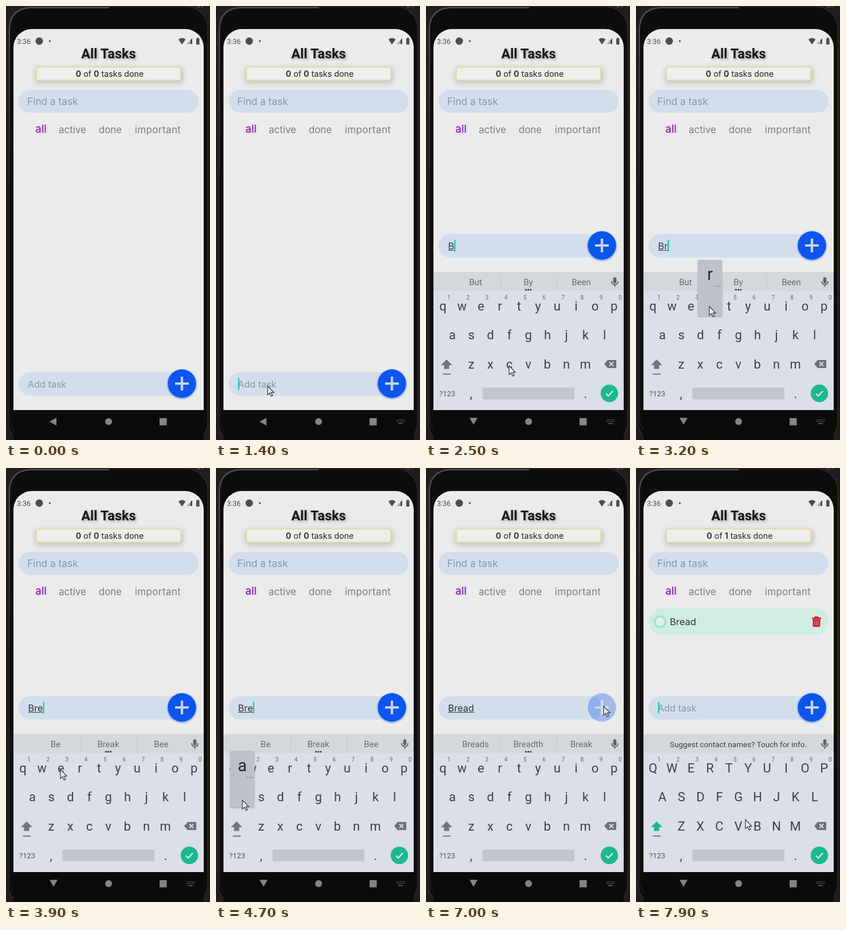
An HTML page for the animation above (8 s loop, 356 by 754 pixels).

```html
<!DOCTYPE html>
<html lang="en">
<head>
<meta charset="utf-8">
<title>Task list</title>
<style>
  html, body { margin: 0; width: 100%; height: 100%; overflow: hidden; background: #161618; }
  svg { display: block; width: 356px; height: 754px; font-family: Inter, "Open Sans", sans-serif; }
  .roboto { font-family: Roboto, Arial, sans-serif; }
  .mid { text-anchor: middle; }
  .hint { fill: #8a93ae; }
  .key { font-size: 22px; fill: #3a4048; }
  .digit { font-size: 10px; fill: #60666f; }
  .word { font-size: 15px; fill: #666b73; }
  .filter { font-size: 17px; fill: #7d7d83; }
</style>
</head>
<body>
<svg viewBox="0 0 356 754">
  <defs>
    <clipPath id="screen"><path d="M13 702V72A32 32 0 0 1 45 40H313A32 32 0 0 1 345 72V702Z"/></clipPath>
    <filter id="soft" x="-20%" y="-80%" width="140%" height="260%"><feGaussianBlur stdDeviation="5"/></filter>
    <filter id="glow" x="-20%" y="-50%" width="140%" height="200%"><feGaussianBlur stdDeviation="1.2"/></filter>
    <filter id="titleShadow" x="-10%" y="-30%" width="120%" height="180%">
      <feDropShadow dx="2" dy="2" stdDeviation="2" flood-color="#555" flood-opacity=".5"/>
    </filter>
    <filter id="tabShadow" x="-30%" y="-30%" width="160%" height="180%">
      <feDropShadow dx="1" dy="1" stdDeviation="1.5" flood-color="#7810a8" flood-opacity=".25"/>
    </filter>
    <linearGradient id="edge" x1="0" y1="0" x2="0" y2="300" gradientUnits="userSpaceOnUse">
      <stop stop-color="#55555a"/><stop offset="1" stop-color="#232326"/>
    </linearGradient>
  </defs>

  <rect width="356" height="754" fill="#1e1e20"/>
  <rect x="4" y="1" width="348" height="760" rx="38" fill="#0d0d0e" stroke="#2a2a2d" stroke-width="1.5"/>
  <path d="M6 300V42Q6 5 42 3H180" fill="none" stroke="url(#edge)" stroke-width="2"/>
  <path d="M6 300V712Q6 740 30 752" fill="none" stroke="#29292c"/>
  <path d="M333 0l2 3M337 0v3M341 3l3-3" stroke="#777"/>

  <rect x="13" y="701" width="332" height="53" fill="#0b0b0c"/>

  <g clip-path="url(#screen)">
    <rect x="13" y="40" width="332" height="662" fill="#ebebeb"/>

    <g fill="#4d4d4d">
      <text class="roboto" x="19" y="65.500" font-size="12.500">3:36</text>
      <circle cx="58" cy="61" r="6.500"/>
      <circle cx="76.500" cy="61" r="1.700"/>
      <path d="M301 58Q307 53 313.500 58L307 67Z"/>
      <path d="M325 56V66H315Z" fill="#aaa"/><path d="M325 56V66H322V59Z"/>
      <path d="M332 56.500h1.500v-1.500h2.500v1.500h1.500v10.500h-5.500Z"/>
    </g>

    <text class="roboto mid" x="179" y="91" font-size="23.500" font-weight="700" fill="#151515" filter="url(#titleShadow)">All Tasks</text>

    <rect x="51" y="107" width="258" height="27" rx="5" fill="#888" opacity=".42" filter="url(#soft)"/>
    <rect x="53" y="106" width="252" height="23" rx="4" fill="#eeeeed" stroke="#e2dda6" stroke-width="2"/>
    <text class="mid" x="181" y="123" font-size="14.300" fill="#222"><tspan font-weight="600">0</tspan> of <tspan id="total" font-weight="600">0</tspan> tasks done</text>

    <rect x="22" y="146" width="314" height="39.500" rx="19.700" fill="#d2deeb"/>
    <text class="hint" x="37" y="172" font-size="17.300">Find a task</text>

    <text class="mid" x="61" y="220" font-size="18.500" fill="#7a18a8" filter="url(#tabShadow)">all</text>
    <text class="filter mid" x="116" y="220.500">active</text>
    <text class="filter mid" x="182" y="220.500">done</text>
    <text class="filter mid" x="265" y="220.500" letter-spacing=".4">important</text>

    <g id="task">
      <rect x="23" y="243" width="313" height="47" rx="22" fill="#d1ece1" filter="url(#glow)"/>
      <circle cx="42" cy="267" r="9" fill="none" stroke="#8ce6c2" stroke-width="3.500" filter="url(#glow)"/>
      <circle cx="42" cy="267" r="7.500" fill="#e6eeea"/>
      <text x="59" y="272.500" font-size="16.500" fill="#2c3431">Bread</text>
      <g fill="#d7172f">
        <path d="M307 260H311L312 258H318L319 260H323V262.500H307Z"/>
        <path d="M308.500 263H321.500V274Q321.500 276 319.500 276H310.500Q308.500 276 308.500 274Z"/>
      </g>
      <path d="M312 265V273.500M315 265V273.500M318 265V273.500" stroke="#e6a7ab"/>
    </g>

    <g id="entry">
      <rect x="22" y="636.500" width="286" height="40.500" rx="20" fill="#d2deeb"/>
      <text id="hint" class="hint" x="38" y="662.500" font-size="16.200">Add task</text>
      <text id="typed" x="38.500" y="662.500" font-size="16.300" fill="#2f3540"></text>
      <path id="underline" stroke="#2f3540"/>
      <rect id="caret" y="646.500" width="2.200" height="20" fill="#19c5ab"/>
      <g id="plus">
        <circle id="halo" cx="307" cy="657" r="26" fill="#7d9fe0" opacity=".8" filter="url(#glow)"/>
        <circle cx="307" cy="656" r="24.700" fill="#0d55ec"/>
        <path d="M296 657.500H320M308 645.500V669.500" stroke="#2a56b4" stroke-width="5" opacity=".5" filter="url(#glow)"/>
        <path d="M295 656H319M307 644V668" stroke="#c6d4f2" stroke-width="4.200"/>
      </g>
    </g>

    <g id="keyboard" class="roboto">
      <rect x="13" y="462" width="332" height="240" fill="#dbdfe7"/>
      <rect x="13" y="462" width="332" height="33" fill="#d4d7dc"/>
      <text id="notice" class="mid" x="178.500" y="485" font-size="13.500" fill="#3a3f45">Suggest contact names? Touch for info.</text>
      <g id="suggestions">
        <text class="word mid" x="86.500" y="485"></text>
        <text class="word mid" x="178.500" y="485"></text>
        <text class="word mid" x="271" y="485"></text>
        <path d="M130.500 468V490M228.500 468V490" stroke="#c4c8ce"/>
        <path d="M173 493H184" stroke="#24282d" stroke-width="2.500" stroke-dasharray="2.800 1.500"/>
      </g>
      <g stroke="#5c636b" fill="none" stroke-width="1.700">
        <rect x="327.500" y="472" width="4" height="9" rx="2" fill="#5c636b"/>
        <path d="M324 478Q324 484 329.500 484T335 478M329.500 484V488"/>
      </g>
      <g id="keys"></g>
      <path id="shift" d="M36 614L46 624H40.500V630.500H31.500V624H26Z"/>
      <path d="M29.500 639.500H43" stroke="#5c636b" stroke-width="1.700"/>
      <path d="M311 622L317 615H332V629H317Z" fill="#6a7179"/>
      <path d="M320 618.500L327 625.500M327 618.500L320 625.500" stroke="#dbdfe7" stroke-width="1.800"/>
      <text x="23" y="678" font-size="13" fill="#4d545c">?123</text>
      <text class="key" x="76.500" y="681">,</text>
      <rect x="98.500" y="663" width="160.500" height="20.500" rx="2" fill="#c2c5cb"/>
      <text class="key" x="275.500" y="681">.</text>
      <circle cx="320" cy="673" r="15.200" fill="#1cb892"/>
      <path d="M314 673.500L318 677.500L326 669" fill="none" stroke="#e4f5f0" stroke-width="2"/>
      <g id="popup">
        <rect x="-21" y="-79" width="42" height="98" rx="2" fill="#666" opacity=".55" filter="url(#glow)"/>
        <rect x="-21" y="-80" width="42" height="98" rx="2" fill="#bdc2ca"/>
        <text class="mid" y="-45" font-size="29" fill="#22272d"></text>
        <path d="M8 -34H19" stroke="#777d85" stroke-width="1.500" stroke-dasharray="2 2"/>
      </g>
    </g>
  </g>

  <g fill="#858585">
    <path id="back"/>
    <circle cx="179" cy="722" r="6"/>
    <rect x="268" y="716" width="12.500" height="12.500"/>
  </g>
  <g id="imeIcon" stroke="#6c6c6c" stroke-width="1.500" stroke-dasharray="1.500 1.500">
    <path d="M315.500 719H329M315.500 722H329"/><path d="M318 725.500H326" stroke-dasharray="none"/>
  </g>

  <path id="cursor" d="M0 0V15.500L3.700 12.200L6.200 18L8.800 16.900L6.300 11.300H11Z" fill="#eeeef2" stroke="#30343c" stroke-width="1.200"/>
</svg>

<script>
const LOOP = 8000;
const $ = id => document.getElementById(id);
const show = (el, on) => { el.style.display = on ? "" : "none"; };
const move = (el, x, y) => el.setAttribute("transform", `translate(${x} ${y})`);
const between = (t, a, b) => t >= a && t < b;
const latest = (list, t) => list.filter(item => item[0] <= t).pop();

const FOCUS = 1280, RAISE = 1580, RAISED = 1800, CLEAR = 7200;

const TEXT = [[0, ""], [2330, "B"], [3150, "Br"], [3680, "Bre"], [4780, "Brea"], [5480, "Bread"], [CLEAR, ""]];
const BLINKS = [[FOCUS], [1700], [2330], [3150], [3680], [4780], [5480], [CLEAR], [7480]];
const WORDS = [
  [0], [2450, "But", "By", "Been"], [3350, "Bro", "Br", "Bring"], [3850, "Be", "Break", "Bee"],
  [4920, "Bread", "Break", "Breath"], [5580, "Breads", "Breadth", "Break"], [CLEAR + 100]
];
const PRESSES = [[2250, "b"], [3070, "r"], [3600, "e"], [4650, "a"], [5450, "d"]];
const PRESS_TIME = 230;

// time, x, y of the pointer tip
const POINTER = [
  [1180, 135, 590], [1300, 90, 660], [1450, 90, 660], [1900, 165, 643], [2150, 145, 625], [2500, 145, 625],
  [3050, 128, 522], [3350, 128, 522], [3600, 96, 523], [3850, 96, 523], [4500, 46, 577], [4900, 46, 577],
  [5300, 112, 573], [5950, 112, 573], [6780, 310, 414], [7300, 310, 414], [7900, 191, 611]
];

const ROWS = [["qwertyuiop", 29.5, 521], ["asdfghjkl", 46, 571.5], ["zxcvbnm", 79, 622]];
const keys = {};

function addText(parent, cls, x, y, text) {
  const el = document.createElementNS("http://www.w3.org/2000/svg", "text");
  el.setAttribute("class", cls);
  el.setAttribute("x", x);
  el.setAttribute("y", y);
  el.textContent = text;
  parent.append(el);
  return el;
}

ROWS.forEach(([letters, left, cy], row) => [...letters].forEach((letter, i) => {
  const x = left + i * 33.2;
  keys[letter] = { x, y: cy, el: addText($("keys"), "key mid", x, cy + 7.5, letter) };
  if (row === 0) addText($("keys"), "digit mid", x + 10.5, 510, (i + 1) % 10);
}));

function pointerAt(t) {
  const i = POINTER.findIndex(p => p[0] > t);
  if (i < 0) return POINTER[POINTER.length - 1].slice(1);
  const [t0, x0, y0] = POINTER[i - 1], [t1, x1, y1] = POINTER[i];
  const u = (t - t0) / (t1 - t0), e = u * u * (3 - 2 * u);
  return [x0 + (x1 - x0) * e, y0 + (y1 - y0) * e];
}

function drawEntry(t) {
  const text = latest(TEXT, t)[1];
  const typed = $("typed");
  move($("entry"), 0, t >= 1700 ? -240 : 0);
  typed.textContent = text;
  show($("hint"), !text);
  const end = 38.5 + (text ? typed.getComputedTextLength() : 0);
  $("underline").setAttribute("d", text ? `M38.500 664.500H${end}` : "");

  const blink = latest(BLINKS, t);
  show($("caret"), blink && (t - blink[0]) % 1000 < 500);
  $("caret").setAttribute("x", end);

  const pressed = between(t, 6960, CLEAR);
  $("plus").setAttribute("opacity", pressed ? 0.33 : 1);
  show($("halo"), !pressed);
}

function drawKeyboard(t) {
  const u = Math.min(1, Math.max(0, (t - RAISE) / (RAISED - RAISE)));
  show($("keyboard"), u > 0);
  move($("keyboard"), 0, 240 * (1 - u) ** 2);

  const upper = !between(t, 2400, CLEAR + 50);
  const shape = letter => upper ? letter.toUpperCase() : letter;
  for (const letter in keys) keys[letter].el.textContent = shape(letter);
  $("shift").setAttribute("fill", upper ? "#17b891" : "#6e757d");

  const words = latest(WORDS, t).slice(1);
  show($("notice"), !words.length);
  show($("suggestions"), words.length);
  $("suggestions").querySelectorAll("text").forEach((el, i) => { el.textContent = words[i] || ""; });

  const press = PRESSES.find(p => between(t, p[0], p[0] + PRESS_TIME));
  show($("popup"), press);
  if (press) {
    const key = keys[press[1]];
    move($("popup"), key.x, key.y);
    $("popup").querySelector("text").textContent = press[1] === "b" ? "B" : press[1];
  }
}

function draw(t) {
  const added = t >= CLEAR;
  show($("task"), added);
  $("total").textContent = added ? 1 : 0;
  drawEntry(t);
  drawKeyboard(t);
  $("back").setAttribute("d", t >= RAISE ? "M76 715.500H90L83 727.500Z" : "M76 722L88 715.500V729Z");
  show($("imeIcon"), t >= FOCUS);

  const visible = t >= POINTER[0][0];
  show($("cursor"), visible);
  if (visible) move($("cursor"), ...pointerAt(t));
}

const start = performance.now();
function tick() {
  draw((performance.now() - start) % LOOP);
  requestAnimationFrame(tick);
}
tick();
</script>
</body>
</html>
```
